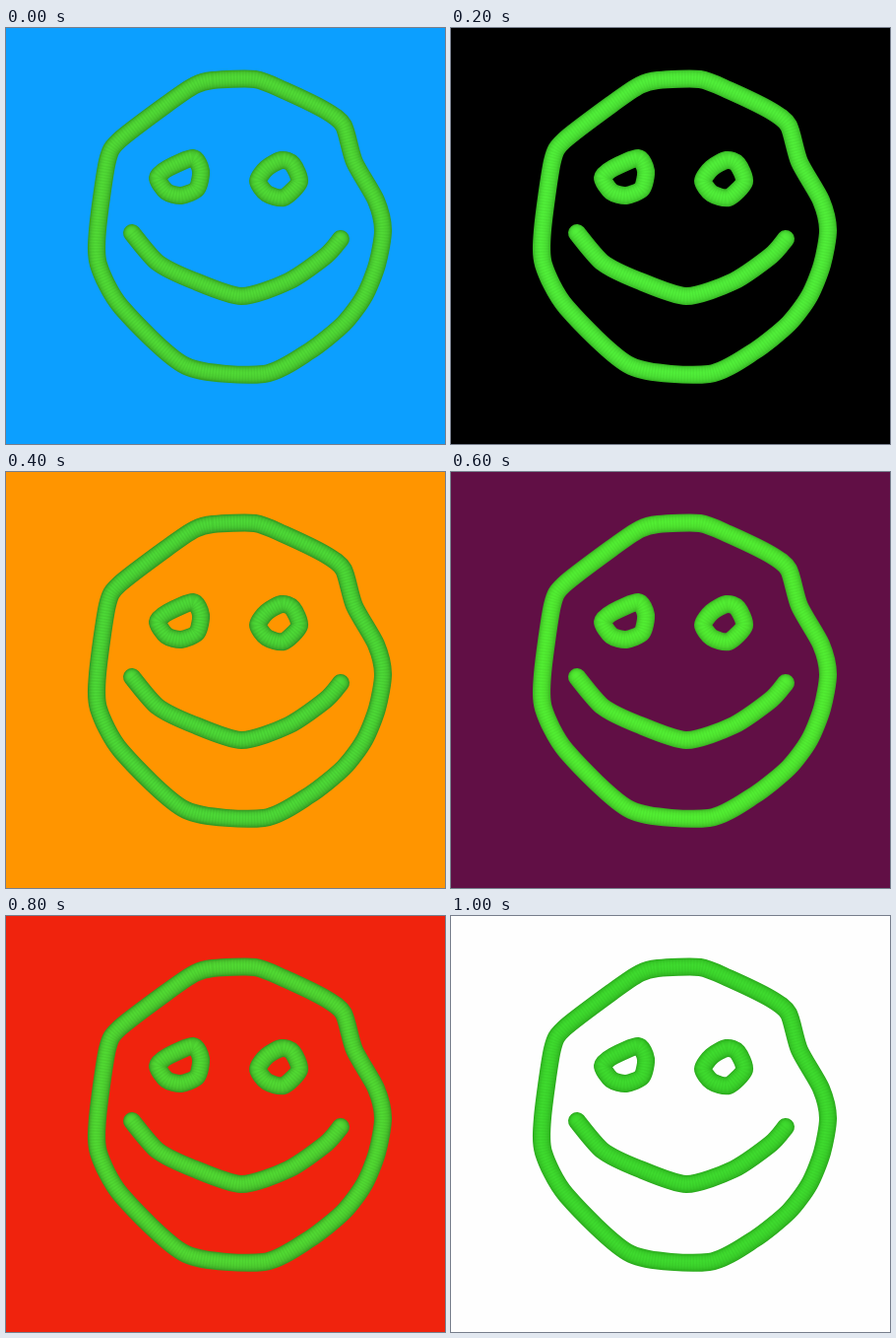
Animation, 446 px wide and 422 px high, one loop 1200 ms. Source, as an HTML page with a canvas:

```html
<!DOCTYPE html>
<html lang="en">
<head>
<meta charset="utf-8">
<title>Flashing smiley</title>
<style>
  html, body { margin: 0; width: 100%; height: 100%; overflow: hidden; }
  canvas { display: block; width: 446px; height: 422px; }
</style>
</head>
<body>
<canvas id="stage" width="446" height="422"></canvas>
<script>
const ctx = document.getElementById('stage').getContext('2d');
const STEP = 200, WIDTH = 18, LAYERS = 8;

// Background, lit paint, shaded paint
const looks = [
  ['#0c9fff', '#54e038', '#36a022'],
  ['#000000', '#54f23c', '#38b826'],
  ['#ff9500', '#52e038', '#349824'],
  ['#610f45', '#56f436', '#3cb424'],
  ['#f0230d', '#56e036', '#389a22'],
  ['#fefefe', '#42e030', '#2cac1e']
];

// Smooth curve through key points
function curve(points, closed) {
  const n = points.length;
  const at = i => points[closed ? (i + n) % n : Math.min(Math.max(i, 0), n - 1)];
  const path = new Path2D();
  path.moveTo(...points[0]);
  for (let i = 0; i < (closed ? n : n - 1); i++) {
    const [a, b, c, d] = [at(i - 1), at(i), at(i + 1), at(i + 2)];
    const ease = (p, from, to, sign) => p.map((v, k) => v + sign * (to[k] - from[k]) / 8);
    path.bezierCurveTo(...ease(b, a, c, 1), ...ease(c, b, d, -1), ...c);
  }
  if (closed) path.closePath();
  return path;
}

const face = new Path2D();
const add = (points, closed = true) => face.addPath(curve(points, closed));

// Head
add([[210, 53], [253, 52], [282, 63], [325, 84], [343, 99], [354, 136],
     [376, 175], [383, 205], [377, 240], [364, 272], [343, 300], [308, 328],
     [262, 351], [183, 343], [117, 283], [94, 240], [93, 205], [103, 135],
     [115, 114], [165, 76], [192, 58]]);
// Eyes
add([[190, 132], [165, 142], [154, 152], [163, 166], [178, 170], [194, 163], [198, 145]]);
add([[280, 134], [265, 142], [256, 155], [265, 168], [282, 172], [298, 156], [291, 138]]);
// Mouth
add([[128, 208], [154, 238], [190, 256], [239, 272], [287, 257], [325, 231], [340, 214]], false);

ctx.lineCap = ctx.lineJoin = 'round';

function draw([back, light, dark]) {
  ctx.fillStyle = back;
  ctx.fillRect(0, 0, 446, 422);
  ctx.strokeStyle = dark;
  ctx.lineWidth = WIDTH;
  ctx.stroke(face);

  // Build the lit side from ever thinner translucent strokes
  ctx.strokeStyle = light;
  ctx.globalAlpha = 0.25;
  for (let i = 1; i <= LAYERS; i++) {
    const k = i / LAYERS;
    ctx.lineWidth = WIDTH * (1 - 0.85 * k);
    ctx.setTransform(1, 0, 0, 1, -k, -1.5 * k);
    ctx.stroke(face);
  }
  ctx.resetTransform();

  // Fine brush ridges
  ctx.save();
  ctx.strokeStyle = dark;
  ctx.globalAlpha = 0.18;
  ctx.lineWidth = WIDTH - 1;
  ctx.lineCap = 'butt';
  ctx.setLineDash([1.5, 1.5]);
  ctx.stroke(face);
  ctx.restore();
  ctx.globalAlpha = 1;
}

let shown = -1;
const start = performance.now();

function tick() {
  const t = performance.now() - start;
  const index = Math.floor(t / STEP) % looks.length;
  if (index !== shown) draw(looks[shown = index]);
  requestAnimationFrame(tick);
}
tick();
</script>
</body>
</html>
```
